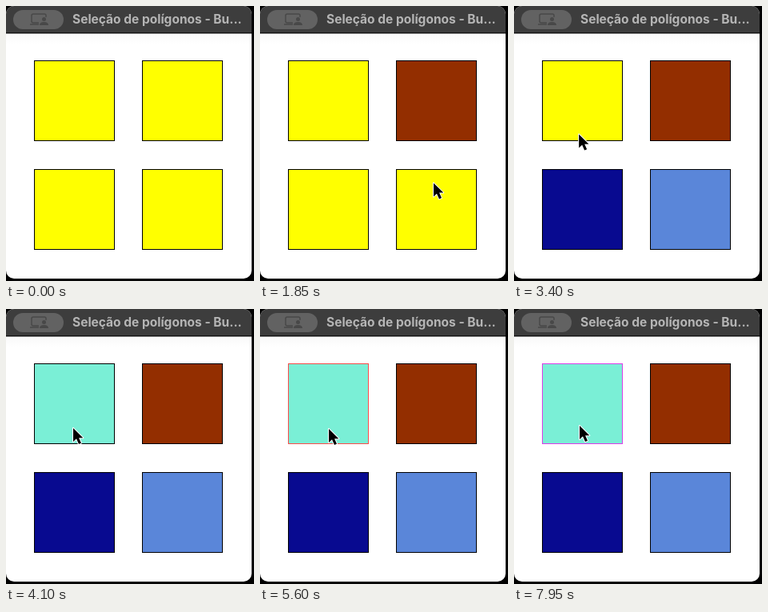
Animation of 310 by 344 pixels, one loop 8 s. Source, as an HTML page:

```html
<!DOCTYPE html>
<html lang="pt">
<head>
<meta charset="utf-8">
<style>
html, body { margin: 0; width: 100%; height: 100%; overflow: hidden; background: #000; }
svg { display: block; width: 310px; height: 344px; }
text { font: 700 15.5px Inter, Roboto, sans-serif; fill: #b5b5b5; }
</style>
</head>
<body>
<svg viewBox="0 0 310 344">
  <defs>
    <clipPath id="frame"><rect width="307" height="341" rx="10"/></clipPath>
    <linearGradient id="shade" x2="0" y2="1">
      <stop stop-color="#f8f8f8"/><stop offset="1" stop-color="#fff"/>
    </linearGradient>
  </defs>
  <g clip-path="url(#frame)">
    <rect width="307" height="341" fill="#fff"/>
    <rect y="34" width="307" height="14" fill="url(#shade)"/>
    <rect width="307" height="34" fill="#3d3d3d"/>
    <rect y="33" width="307" height="1.5" fill="#111"/>
    <rect x="9" y="5" width="63" height="24" rx="12" fill="#626262"/>
    <g fill="none" stroke="#484848" stroke-width="1.5">
      <path d="M41 21H34Q32 21 32 19V12Q32 10 34 10H48Q50 10 50 12V14M30 23H41"/>
      <g fill="#484848" stroke="none"><circle cx="47.5" cy="16.5" r="2.5"/><path d="M42 24Q42 20 47.5 20T53 24Z"/></g>
    </g>
    <text x="83" y="22">Seleção de polígonos - Bu...</text>
    <g id="squares" stroke="#000"></g>
    <path id="cursor" d="M0 0V17L4 13.3L7 20L10 18.7L7.1 12.2H12.3Z" fill="#000" stroke="#fff" stroke-width="2" paint-order="stroke" stroke-linejoin="round"/>
  </g>
</svg>
<script>
const LOOP = 8000;
const group = document.getElementById('squares');
const cursor = document.getElementById('cursor');

// x, y, time of the click, colour after it
const squares = [
  [35.5, 68.5, 3600, '#7aefd6'],
  [170.5, 68.5, 1550, '#932e00'],
  [35.5, 204.5, 3000, '#080a90'],
  [170.5, 204.5, 2150, '#5a86d9']
].map(([x, y, at, color]) => {
  const el = document.createElementNS('http://www.w3.org/2000/svg', 'rect');
  for (const [k, v] of Object.entries({ x, y, width: 100, height: 100 })) el.setAttribute(k, v);
  group.append(el);
  return { el, at, color };
});

const borders = [[0, '#000'], [4800, '#ff4a4a'], [6300, '#7d2a20'], [7500, '#dc3ce8']];

// time, x, y of the pointer tip
const path = [
  [1250, 312, 108], [1350, 232, 139], [1450, 222, 129], [1600, 221, 128],
  [1950, 216, 244], [2200, 214, 246], [2650, 50, 254], [2850, 66, 250],
  [3050, 68, 249], [3500, 83, 148], [3900, 84, 149], [4450, 84, 149],
  [4800, 86, 150], [7450, 86, 150], [7900, 82, 146], [LOOP, 82, 146]
];

function pointAt(t) {
  const i = path.findIndex(p => p[0] > t);
  if (i < 1) return [330, 108];
  const [a, b] = [path[i - 1], path[i]];
  const u = (t - a[0]) / (b[0] - a[0]);
  const e = u * u * (3 - 2 * u);
  return [1, 2].map(k => a[k] + (b[k] - a[k]) * e);
}

function draw(now) {
  const t = now % LOOP;
  for (const { el, at, color } of squares) el.setAttribute('fill', t < at ? '#ff0' : color);
  squares[0].el.setAttribute('stroke', borders.findLast(b => b[0] <= t)[1]);
  cursor.setAttribute('transform', `translate(${pointAt(t)})`);
  requestAnimationFrame(draw);
}
draw(0);
</script>
</body>
</html>
```
